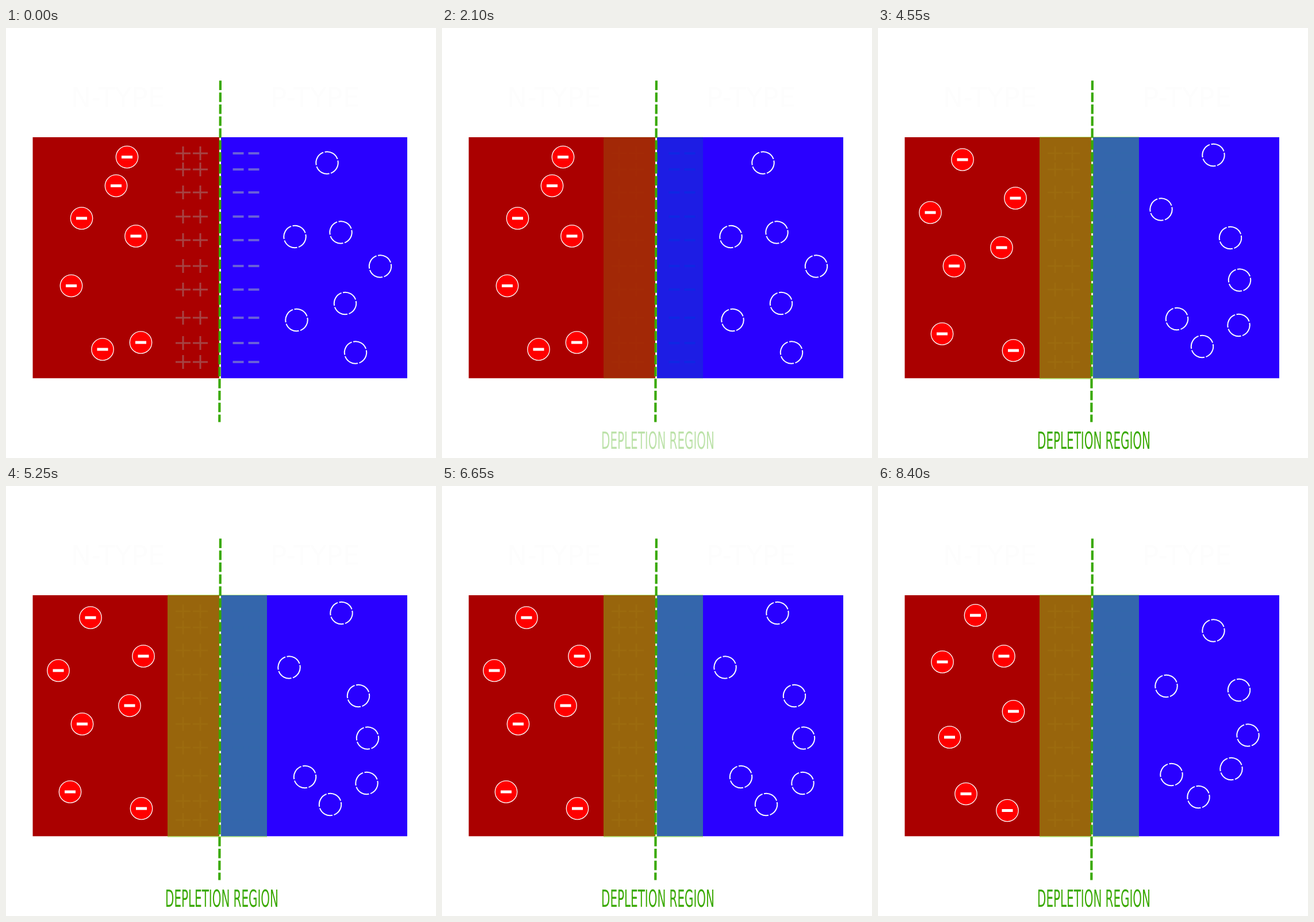
An HTML page for the animation above (8750 ms loop, 748 by 748 pixels).

```html
<!DOCTYPE html>
<html lang="en">
<head>
<meta charset="utf-8">
<title>Depletion region</title>
<style>
html, body { margin: 0; width: 100%; height: 100%; overflow: hidden; background: #fff; }
svg { display: block; width: 100vw; height: 100vh; }
text { font-family: "DejaVu Sans", sans-serif; }
</style>
</head>
<body>
<svg viewBox="0 0 748 748">
  <defs>
    <g id="electron">
      <circle r="19.2" fill="#f00" stroke="#fff" stroke-width="1.3"/>
      <path d="M-9.5 0h19" stroke="#fff" stroke-width="5"/>
    </g>
    <circle id="hole" r="19.2" fill="none" stroke="#fff" stroke-width="2"
      pathLength="360" stroke-dasharray="82 8" transform="rotate(-12)"/>
  </defs>
  <g font-size="47" fill="#fdfdfd">
    <text x="113" y="137">N-TYPE</text>
    <text x="460" y="137">P-TYPE</text>
  </g>
  <path d="M46.5 190H371V609.3H46.5z" fill="#a00"/>
  <path d="M374 190H698V609.3H374z" fill="#2a00ff"/>
  <g id="band">
    <path id="edge" d="M281 189H454V611H281z"/>
    <path id="bandN" d="M281 190H371V609.3H281z"/>
    <path id="bandP" d="M374 190H454V609.3H374z"/>
  </g>
  <path id="seam" d="M371 190H374V609.3H371z"/>
  <path id="plus" fill="none" stroke-width="3"/>
  <path id="minus" fill="none" stroke-width="4.2"/>
  <path d="M372.9 91.5L371.3 685.5" stroke="#39a900" stroke-width="4.2" stroke-dasharray="16.6 4.15"/>
  <g id="bits"></g>
  <text id="label" transform="translate(375.5 731.5) scale(.486 1)" text-anchor="middle"
    font-size="41" fill="#39a900">DEPLETION REGION</text>
</svg>
<script>
const LOOP = 8750, STEP = 350;
const $ = id => document.getElementById(id);
const clamp = (v, lo, hi) => Math.min(hi, Math.max(lo, v));
const mix = (a, b, k) => a.map((v, i) => v + (b[i] - v) * k);

// Key points of each carrier: start, then the two spots it wanders between
const electrons = [
  [[210.5, 224.5], [169.5, 225], [147, 229]],
  [[191.5, 274.5], [219, 296], [239, 296]],
  [[131.5, 331], [112, 306], [91, 321]],
  [[226, 362], [235.5, 392], [215, 382]],
  [[113.5, 448.5], [124.5, 437], [132.5, 414]],
  [[168, 559], [153, 535.5], [111.5, 532]],
  [[234.5, 547], [225, 564.5], [235.5, 561]]
];
const holes = [
  [[558.5, 234.5], [583.5, 251.5], [583.5, 221]],
  [[502.5, 363], [501.5, 348], [492.5, 315.5]],
  [[582.5, 355.5], [628, 355], [613, 365]],
  [[651, 414.5], [643.5, 433.5], [629, 438.5]],
  [[590, 479], [614.5, 492], [627.5, 517]],
  [[505.5, 508], [510.5, 502], [520, 506]],
  [[608, 564.5], [557.5, 541], [564, 554]]
];

// D drift, N near, H home, F overshoot past home
const order = "DNHFHNHFHFHNHN";
const spots = {
  S: ([start]) => start,
  D: ([start, near]) => mix(start, near, 0.5),
  N: ([, near]) => near,
  H: ([, , home]) => home,
  F([, near, home]) {
    const [x, y] = mix(near, home, 1.6);
    return [x, clamp(y, 221, 562)];
  }
};

const makeBits = (list, shape) => list.map(keys => {
  const el = document.createElementNS("http://www.w3.org/2000/svg", "use");
  el.setAttribute("href", "#" + shape);
  $("bits").appendChild(el);
  return { el, keys };
});
const bits = [...makeBits(electrons, "electron"), ...makeBits(holes, "hole")];

// Fixed charges, two columns on each side
const rows = [218, 246, 286, 328, 369, 414, 455, 504, 548, 581];
const marks = (cols, shape) => rows.flatMap(y => cols.map(x => shape(x, y))).join("");
$("plus").setAttribute("d", marks([308, 338], (x, y) => `M${x - 13} ${y}h26M${x} ${y - 12}v24`));
$("minus").setAttribute("d", marks([404, 431], (x, y) => `M${x - 9.5} ${y}h19`));

const white = [255, 255, 255];
const paint = (id, attr, rgb) => $(id).setAttribute(attr, `rgb(${rgb.map(Math.round)})`);

function draw(ms) {
  const s = Math.max(0, Math.floor((ms - 700) / STEP));
  const fade = clamp(s / 2, 0, 1);
  const tint = clamp((s - 2) / 7, 0, 1);
  const mark = (first, from, to) => mix(mix(first, from, fade), to, tint);

  $("band").setAttribute("visibility", s < 2 ? "hidden" : "visible");
  paint("edge", "fill", mix(white, [190, 240, 140], tint));
  paint("seam", "fill", mix(white, [228, 247, 205], tint));
  paint("bandN", "fill", mix([166, 16, 3], [152, 101, 12], tint));
  paint("bandP", "fill", mix([20, 0, 250], [52, 102, 172], tint));
  paint("plus", "stroke", mark([166, 68, 68], [166, 16, 3], [156, 107, 14]));
  paint("minus", "stroke", mark([105, 95, 217], [0, 14, 250], [51, 103, 171]));
  $("label").setAttribute("opacity", clamp((s - 3) / 3, 0, 1));

  const spot = spots[order[s - 9] || "S"];
  for (const { el, keys } of bits) el.setAttribute("transform", `translate(${spot(keys)})`);
}

const t0 = performance.now();
function tick() {
  draw((performance.now() - t0) % LOOP);
  requestAnimationFrame(tick);
}
tick();
</script>
</body>
</html>
```
